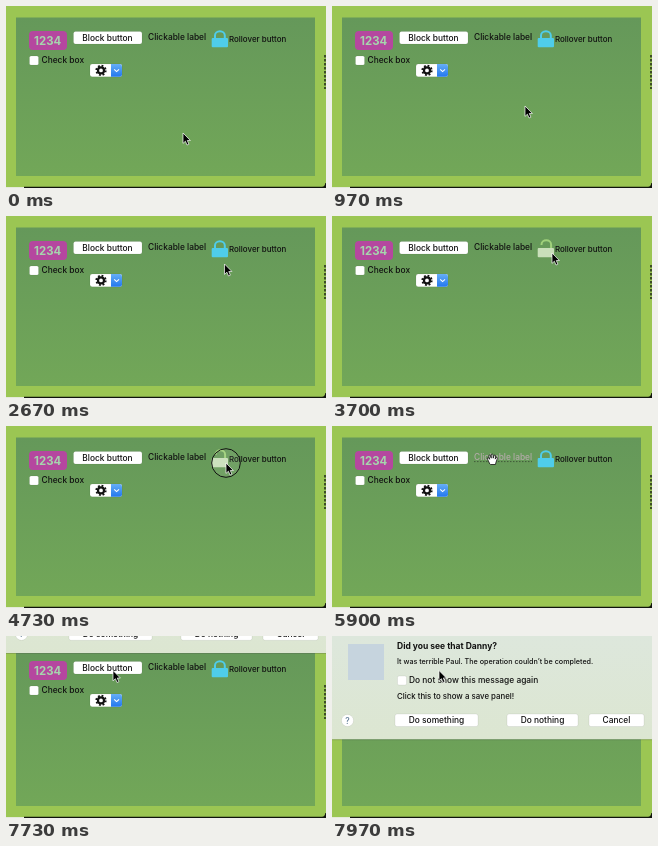
Animation, 320 px wide and 182 px high, one loop 8 s. Source, as an HTML page:

```html
<!DOCTYPE html>
<html lang="en">
<head>
<meta charset="utf-8">
<title>Button demo</title>
<style>
  html, body { margin: 0; width: 100%; height: 100%; overflow: hidden; background: #9bc653; }
  svg { display: block; width: 100%; height: 100%; }
  text { font: 500 8.4px Inter, "Liberation Sans", sans-serif; fill: #111; white-space: pre; }
  .push { fill: #fff; stroke: #0002; stroke-width: .5; }
  .mid { text-anchor: middle; }
</style>
</head>
<body>
<svg viewBox="0 0 320 182">
  <defs>
    <linearGradient id="panel" x2="0" y2="1">
      <stop stop-color="#65985a"/><stop offset="1" stop-color="#72a758"/>
    </linearGradient>
    <linearGradient id="blue" x2="0" y2="1">
      <stop stop-color="#66aef8"/><stop offset="1" stop-color="#2277ee"/>
    </linearGradient>
    <linearGradient id="paper" x2="0" y2="1">
      <stop stop-color="#dde7dc"/><stop offset="1" stop-color="#dce6d1"/>
    </linearGradient>
  </defs>

  <rect width="320" height="182" fill="#9bc653"/>
  <path d="M18 182V180.7H316Q319 180.7 319.3 177H320V182Z" fill="#10140c"/>
  <path d="M0 181.5H18" stroke="#e4ead8"/>
  <path d="M319 49v34" stroke="#26301c" stroke-width="1.6" stroke-dasharray="2.5 1.5"/>
  <rect x="10" y="11.5" width="299" height="158.5" fill="url(#panel)"/>

  <rect x="23" y="25" width="38" height="19" rx="4" fill="#b5479f"/>
  <text class="mid" x="41.7" y="38.8" style="font-size:11.4px;font-weight:700;fill:#a6d5ad">1234</text>
  <rect class="push" x="67.5" y="25.5" width="68.5" height="12.5" rx="2"/>
  <text class="mid" x="101.5" y="34.8">Block button</text>
  <text id="label" x="142" y="34.1">Clickable label</text>
  <path id="underline" d="M142 35.6H200" stroke="#3c5236" stroke-width=".9" stroke-dasharray="1.5 1.5"/>

  <g id="lock">
    <path id="shackle" fill="none" stroke-width="2"/>
    <rect x="205.7" y="32" width="16.3" height="9.2" rx="1"/>
  </g>
  <text x="223" y="36.3" style="font-size:7.95px">Rollover button</text>

  <rect class="push" x="23.5" y="50" width="9" height="9" rx="1.5"/>
  <text x="35.5" y="57.4">Check box</text>

  <rect class="push" x="84" y="58" width="32" height="12.8" rx="2.2"/>
  <path d="M105 58h8.6q2.4 0 2.4 2.4v8q0 2.4-2.4 2.4h-8.6z" fill="url(#blue)"/>
  <path d="M108.2 63.3l2.4 2.3 2.4-2.3" fill="none" stroke="#fff" stroke-width="1.1"/>
  <g fill="none" stroke="#111">
    <circle cx="95" cy="64.4" r="3" stroke-width="2.2"/>
    <circle cx="95" cy="64.4" r="4.7" stroke-width="1.8" stroke-dasharray="1.85 1.84"/>
  </g>

  <g id="sheet">
    <rect y="103" width="320" height="1.2" fill="#0003"/>
    <rect width="320" height="103.3" fill="url(#paper)"/>
    <rect x="16" y="8" width="36" height="36" fill="#c6d4de"/>
    <text x="65" y="13" style="font-size:8.5px;font-weight:700">Did you see that Danny?</text>
    <text x="65" y="28" style="font-size:7.2px">It was terrible Paul. The operation couldn’t be completed.</text>
    <rect class="push" x="65.5" y="40" width="9" height="9" rx="1.5"/>
    <text x="77" y="47.4">Do not show this message again</text>
    <text x="65" y="62.8" style="font-size:7.85px">Click this to show a save panel!</text>
    <circle class="push" cx="15.5" cy="84.5" r="6"/>
    <text class="mid" x="15.5" y="87.7" style="fill:#5c7894">?</text>
    <g id="choices"></g>
  </g>

  <circle id="ring" r="14.3" fill="#fff1" stroke="#111" stroke-width="1"/>
  <g id="pointer" stroke-linejoin="round">
    <path id="arrow" d="M0 0V10.4L2.4 8.2 4 12 5.9 11.2 4.3 7.5H7.4Z" fill="#000" stroke="#fff" stroke-width=".7"/>
    <path id="hand" d="M-2.6 5L-5-.1Q-5.3-1.6-3.8-1.2L-2.8.3-3.6-3Q-3.3-4.7-2.1-3.7L-1.2-.8-1.2-4.3Q-.2-5.6.6-4.3L.8-.8 1.7-3.8Q2.9-4.5 3.2-3.2L2.8.1 3.9-1.6Q5.1-1.9 4.9-.4L3.6 3.2 3 5.5H-2Z" fill="#fff" stroke="#111" stroke-width=".8"/>
  </g>
</svg>
<script>
const LOOP = 8000;
const $ = id => document.getElementById(id);
const show = (id, on) => $(id).setAttribute('display', on ? 'inline' : 'none');
const move = (id, x, y) => $(id).setAttribute('transform', `translate(${x} ${y})`);
const progress = (t, from, to) => Math.min(1, Math.max(0, (t - from) / (to - from)));
const smooth = p => p * p * (3 - 2 * p);
const inside = ([x, y], left, top, right, bottom) => x >= left && x <= right && y >= top && y <= bottom;

// time, x, y of the pointer's hot spot
const route = [
  [0, 177, 127], [970, 193, 100], [2670, 218.5, 48], [3500, 220, 37], [4900, 220, 37],
  [5550, 162, 33], [6050, 160, 33], [6930, 142.5, 52], [7500, 107, 34.5], [LOOP, 107, 34.5]
];
const clicks = [[4600, 4850], [7540, 7660]];

$('choices').innerHTML = [['Do something', 63, 83], ['Do nothing', 175, 71], ['Cancel', 257, 55]]
  .map(([name, x, w]) => `<rect class="push" x="${x}" y="78" width="${w}" height="12.5" rx="2"/>
    <text class="mid" x="${x + w / 2}" y="87.3">${name}</text>`).join('');

function pointerAt(t) {
  const i = route.findIndex(stop => stop[0] > t);
  const [t0, x0, y0] = route[i - 1], [t1, x1, y1] = route[i];
  const p = smooth(progress(t, t0, t1));
  return [x0 + (x1 - x0) * p, y0 + (y1 - y0) * p];
}

function draw(t) {
  const at = pointerAt(t);
  const onLabel = inside(at, 142, 24, 201, 39);
  const onLock = inside(at, 205, 24, 282, 43);

  $('label').style.fill = onLabel ? '#b3aba9' : '#111';
  show('underline', onLabel);
  $('lock').setAttribute('fill', onLock ? '#c9dfba' : '#4fcdea');
  $('shackle').setAttribute('stroke', onLock ? '#a0d17b' : '#4fcdea');
  $('shackle').setAttribute('d', onLock
    ? 'M209.5 29V28.5a4.8 4.2 0 0 1 9.6 0V33'
    : 'M209 33V29.5a4.9 4.3 0 0 1 9.8 0V33');

  move('pointer', ...at);
  move('ring', ...at);
  show('arrow', !onLabel);
  show('hand', onLabel);
  show('ring', clicks.some(([from, to]) => t >= from && t < to));

  const drop = smooth(progress(t, 7660, 7930));
  show('sheet', drop > 0);
  move('sheet', 0, -104 * (1 - drop));
}

function tick() {
  draw(performance.now() % LOOP);
  requestAnimationFrame(tick);
}
tick();
</script>
</body>
</html>
```
